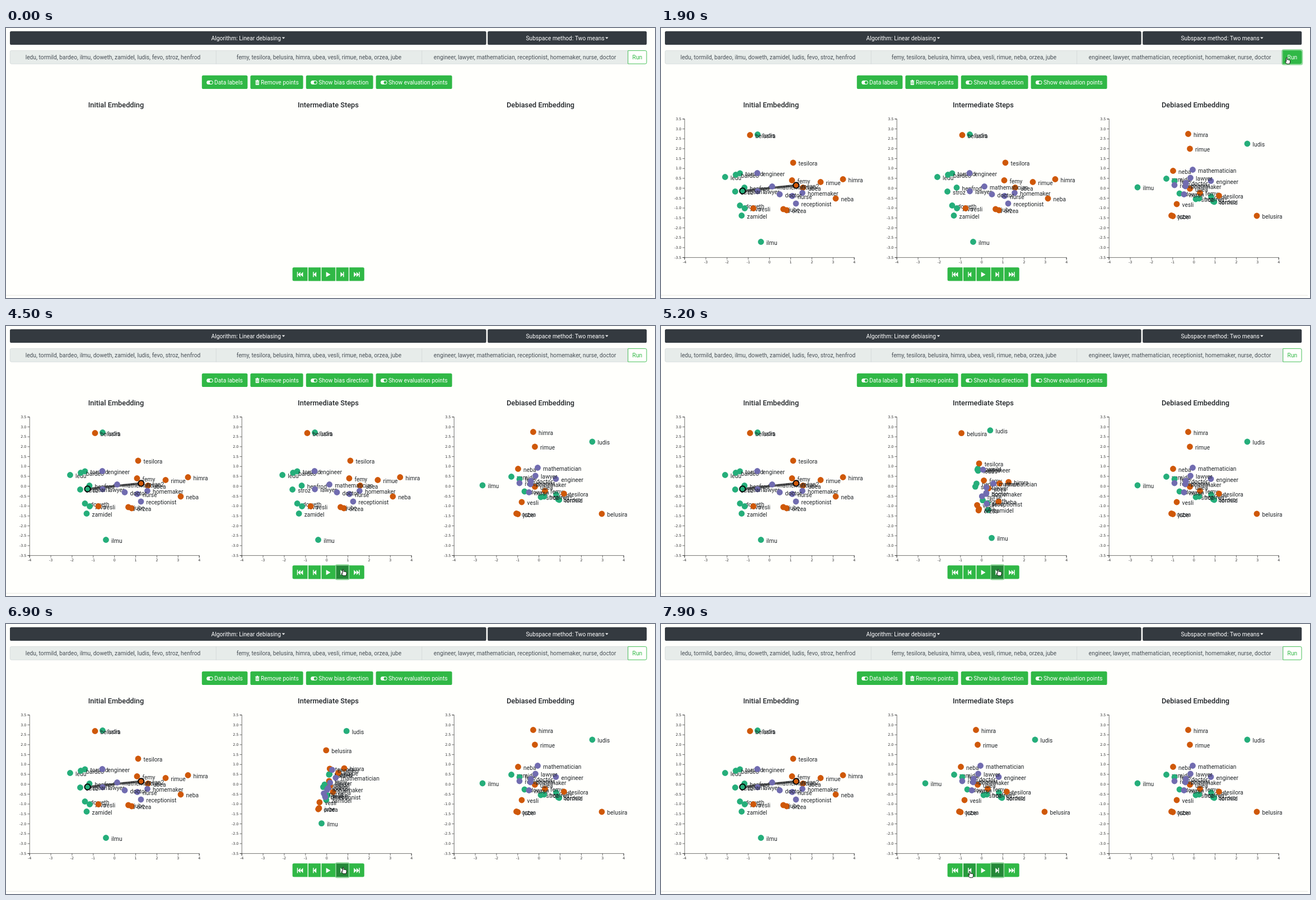
These frames come from a looping animation (1159x483 px, 8 s). An HTML page with a canvas:

```html
<!DOCTYPE html>
<html lang="en">
<head>
<meta charset="utf-8">
<title>Embedding debiasing</title>
<style>
html, body { margin: 0; width: 1159px; height: 483px; overflow: hidden; background: #fffffc; }
canvas { display: block; }
</style>
</head>
<body>
<canvas id="stage" width="1159" height="483"></canvas>
<script>
const ctx = document.getElementById("stage").getContext("2d");
const LOOP = 8000, STEP = 100, PANEL = 379;
const BODY = "10.24px Roboto, sans-serif";
const HEAD = "500 12.8px Roboto, sans-serif";
const TICK = "6.4px 'DejaVu Sans', sans-serif";
const PAGE = "#fffffc", INK = "#212529", DARK = "#343a40";
const GREEN = [48, 184, 70], HOVER = [40, 156, 62], ACTIVE = [36, 136, 56];
const GROUPS = ["#25ae7a", "#cf5808", "#716cb0"];

// word, first x, first y, shift along the bias direction, last x, last y
const WORDS = [
  [["ledu", 114.5, 266.5, 76, 224.5, 301.5],
   ["tormild", 141, 260, 48, 230, 311],
   ["bardeo", 133.5, 262.5, 55, 228, 310],
   ["ilmu", 178.5, 382.5, 34.5, 93, 285],
   ["doweth", 141, 317.5, 57, 168, 296],
   ["zamidel", 144, 335.5, 64, 144.5, 269.5],
   ["ludis", 172.5, 190.5, 38, 289, 207],
   ["fevo", 149.5, 322.5, 57, 159, 274],
   ["stroz", 132.5, 292.5, 52, 197, 306],
   ["henfrod", 149, 285.5, 37, 203, 305]],
  [["femy", 234, 272.5, -38, 204.5, 295],
   ["tesilora", 236, 241, -49, 238.5, 300],
   ["belusira", 159, 191.5, -1.5, 306, 336],
   ["himra", 325, 270.5, -87, 183.5, 189.5],
   ["ubea", 253.5, 285.5, -50, 186.5, 287.5],
   ["vesli", 165, 322.5, 21.5, 163, 315],
   ["rimue", 285, 275.5, -62, 186.5, 216],
   ["neba", 312, 305, -92, 156.5, 255.5],
   ["orzea", 224.5, 326, -38, 153.5, 335.5],
   ["jube", 218.5, 324, -31, 156, 336.5]],
  [["engineer", 172, 259.5, 25, 224, 273.5],
   ["lawyer", 172.5, 292, 31, 187.5, 268],
   ["mathematician", 198.5, 283.5, 17, 191.5, 253.5],
   ["receptionist", 241, 314, -40, 159, 281],
   ["homemaker", 252.5, 295, -53, 178.5, 283],
   ["nurse", 234.5, 300.5, -42, 176, 297.5],
   ["doctor", 212, 297.5, -10.5, 179.5, 277]]
];
const listOf = group => WORDS[group].map(row => row[0]).join(", ");

// time, x, y of the pointer tip
const PATH = [
  [500, 690, 20], [600, 810, 22], [700, 930, 36], [800, 1030, 47], [900, 1060.5, 52],
  [1000, 1060.5, 52], [1100, 1072, 53], [1200, 1105, 54], [1300, 1116, 54], [1400, 1117.5, 53],
  [2500, 1117.5, 53], [2600, 1108, 62], [2700, 1050, 105], [2900, 800, 228], [3000, 688.5, 272],
  [3200, 632, 350], [3400, 617, 381], [3700, 609, 414], [4000, 602, 435.5],
  [7500, 602, 435.5], [7700, 575, 440], [7900, 551.5, 442.5]
];

const clamp = v => Math.max(0, Math.min(1, v));
const ramp = (t, start, length) => clamp((t - start) / length);
const mix = (a, b, k) => a + (b - a) * k;
const blend = (a, b, k) => `rgb(${a.map((v, i) => Math.round(mix(v, b[i], k)))})`;
const cubic = k => k < .5 ? 4 * k ** 3 : 1 - 4 * (1 - k) ** 3;

function text(str, x, y, color, font = BODY, align = "left") {
  ctx.font = font;
  ctx.textAlign = align;
  ctx.fillStyle = color;
  ctx.fillText(str, x, y);
}

function box(x, y, w, h, color, radius = 2.56) {
  ctx.beginPath();
  ctx.roundRect(x, y, w, h, radius);
  ctx.fillStyle = color;
  ctx.fill();
}

function poly(points, color) {
  ctx.beginPath();
  points.forEach(([x, y]) => ctx.lineTo(x, y));
  ctx.closePath();
  ctx.fillStyle = color;
  ctx.fill();
}

function line(x1, y1, x2, y2, color, width) {
  ctx.beginPath();
  ctx.moveTo(x1, y1);
  ctx.lineTo(x2, y2);
  ctx.strokeStyle = color;
  ctx.lineWidth = width;
  ctx.stroke();
}

function dot(x, y, r, color) {
  ctx.beginPath();
  ctx.arc(x, y, r, 0, 7);
  ctx.fillStyle = color;
  ctx.fill();
}

function ring(x, y, w, h, alpha) {
  if (!alpha) return;
  ctx.beginPath();
  ctx.roundRect(x - 1, y - 1, w + 2, h + 2, 3);
  ctx.strokeStyle = `rgba(48,184,70,${.5 * alpha})`;
  ctx.lineWidth = 2;
  ctx.stroke();
}

function header() {
  box(7, 5.7, 850.6, 24.3, DARK);
  box(860.2, 5.7, 284, 24.3, DARK);
  text("Algorithm: Linear debiasing", 366.5, 22, "#fff");
  text("Subspace method: Two means", 928.5, 22, "#fff");
  for (const x of [492.8, 1070.2]) poly([[x, 16.6], [x + 5.4, 16.6], [x + 2.7, 19.4]], "#fff");

  ctx.beginPath();
  ctx.roundRect(7.3, 40.3, 1103, 23.9, [2.5, 0, 0, 2.5]);
  ctx.fillStyle = "#e7ecea";
  ctx.fill();
  ctx.strokeStyle = "#ced4d6";
  ctx.lineWidth = .7;
  ctx.stroke();
  [375.2, 742.7].forEach(x => line(x, 40, x, 64.5, "#ced4d6", .7));
  [191, 559, 926.7].forEach((x, i) => text(listOf(i), x, 56.2, "#495057", BODY, "center"));
}

function runButton(t) {
  const fill = ramp(t, 1150, 150) - ramp(t, 2550, 150);
  const focus = ramp(t, 1650, 150) - ramp(t, 4250, 150);
  ring(1110.3, 40, 34, 24.5, focus);
  ctx.beginPath();
  ctx.roundRect(1110.8, 40.4, 33.2, 23.7, [0, 2.5, 2.5, 0]);
  ctx.fillStyle = blend([255, 255, 252], GREEN, fill);
  ctx.fill();
  ctx.strokeStyle = blend(GREEN, GREEN, 0);
  ctx.lineWidth = .9;
  ctx.stroke();
  text("Run", 1127.4, 56.2, blend(GREEN, [255, 255, 255], fill), BODY, "center");
}

function toggleIcon(x) {
  box(x, 94, 11.6, 7, "#fff", 3.5);
  dot(x + 8.1, 97.5, 2.5, blend(GREEN, GREEN, 0));
}

function trashIcon(x) {
  box(x, 94, 7.6, 1.1, "#fff", .3);
  box(x + 2.2, 92.8, 3.2, 1.2, "#fff", .4);
  box(x + .7, 95.3, 6.2, 6.7, "#fff", .8);
  for (const d of [2.2, 3.8, 5.4]) line(x + d, 96.6, x + d, 100.6, blend(GREEN, GREEN, 0), .6);
}

function toolbar() {
  const items = [
    ["Data labels", 349.8, 431.4, 372], ["Remove points", 436.4, 530.6, 455],
    ["Show bias direction", 535.8, 655.6, 558.3], ["Show evaluation points", 660.6, 796.6, 683]
  ];
  items.forEach(([label, left, right, textX], i) => {
    box(left, 84.8, right - left, 24.3, blend(GREEN, GREEN, 0));
    i === 1 ? trashIcon(445) : toggleIcon(left + 8.4);
    text(label, textX, 101, "#fff");
  });
  ["Initial Embedding", "Intermediate Steps", "Debiased Embedding"].forEach((label, i) =>
    text(label, 196.5 + i * PANEL, 142, INK, HEAD, "center"));
}

const MID = 440.9;
const triangle = (x, w, dir) =>
  poly([[x, MID - 4.6], [x, MID + 4.6], [x + w * dir, MID]], "#fff");
const bar = x => box(x, MID - 4.6, 1.5, 9.2, "#fff", .3);

function playerButtons(t) {
  const edges = [[511.6, 538.6], [540, 562], [563.4, 588.2], [589.5, 611.8], [613.2, 639.8]];
  const nextHover = ramp(t, 3800, 150), press = ramp(t, 4250, 150);
  const next = press ? blend(HOVER, ACTIVE, press) : blend(GREEN, HOVER, nextHover);
  const fills = Array(5).fill(blend(GREEN, GREEN, 0));
  fills[1] = blend(GREEN, HOVER, ramp(t, 7700, 150));
  fills[3] = next;
  edges.forEach(([left, right], i) =>
    box(left, 428.3, right - left, 24.3, fills[i], [i ? 0 : 2.5, i < 4 ? 0 : 2.5, i < 4 ? 0 : 2.5, i ? 0 : 2.5]));
  ring(589.5, 428.3, 22.3, 24.3, press);

  bar(519.8); triangle(525.8, 4.6, -1); triangle(530.4, 4.6, -1);
  bar(548.2); triangle(554.2, 4.9, -1);
  triangle(571.7, 7.8, 1);
  triangle(597.4, 4.9, 1); bar(602);
  triangle(621.2, 4.6, 1); triangle(625.8, 4.6, 1); bar(630.2);
}

function axes(left) {
  const right = left + 303, top = 162.8, bottom = 410.6;
  ctx.beginPath();
  ctx.moveTo(left - 3.8, top);
  ctx.lineTo(left, top);
  ctx.lineTo(left, bottom);
  ctx.lineTo(left - 3.8, bottom);
  ctx.moveTo(left, bottom + 3.8);
  ctx.lineTo(left, bottom);
  ctx.lineTo(right, bottom);
  ctx.lineTo(right, bottom + 3.8);
  ctx.strokeStyle = "#222";
  ctx.lineWidth = .64;
  ctx.stroke();
  for (let i = 0; i <= 14; i++) {
    const y = mix(top, bottom, i / 14);
    line(left - 3.8, y, left, y, "#222", .64);
    text((3.5 - i / 2).toFixed(1), left - 5.8, y + 2.1, "#333", TICK, "right");
  }
  for (let i = 0; i <= 8; i++) {
    const x = mix(left, right, i / 8);
    line(x, bottom, x, bottom + 3.8, "#222", .64);
    text(String(i - 4), x, bottom + 10.4, "#333", TICK, "center");
  }
}

function cloud(offset, project, debias) {
  WORDS.forEach((rows, group) => rows.forEach(([word, x, y, shift, endX, endY]) => {
    const px = offset + mix(x + shift * project, endX, debias);
    const py = mix(y - shift * project * .104, endY, debias);
    dot(px, py, 5.4, GROUPS[group]);
    text(word, px + 9.6, py + 5.1, INK);
  }));
}

function means() {
  [["mean1", 145.6, 291.5], ["mean2", 241.3, 281.5]].forEach(([label, x, y], i) => {
    dot(x, y, 5.2, GROUPS[i]);
    ctx.strokeStyle = "#000";
    ctx.lineWidth = 1.9;
    ctx.stroke();
    text(label, x + 9.6, y + 5.1, INK);
  });
}

function plots(t) {
  if (t < 1800) return;
  const project = cubic(ramp(t, 4420, 1000)), debias = cubic(ramp(t, 6510, 1000));
  for (let i = 0; i < 3; i++) axes(42.2 + i * PANEL);
  line(145.6, 291.5, 241.3, 281.5, "#555", 3.8);
  cloud(0, 0, 0);
  means();
  cloud(PANEL, project, debias);
  cloud(2 * PANEL, 1, 1);
}

function outline(points) {
  poly(points, "#fff");
  ctx.strokeStyle = "#000";
  ctx.lineWidth = .9;
  ctx.lineJoin = "round";
  ctx.stroke();
}

const SHAPES = {
  arrow() {
    outline([[0, 0], [0, 10.6], [2.6, 8.3], [4.4, 12.2], [6.1, 11.4], [4.4, 7.7], [7.9, 7.5]]);
  },
  hand() {
    outline([[-.9, .4], [0, -.1], [.9, .4], [1, 3.8], [2.5, 3.5], [3.2, 4.2], [4.7, 4.1],
      [6.2, 5.1], [6.1, 8], [5.1, 11.2], [-.2, 11.2], [-2.8, 7.4], [-2.4, 6.3], [-.9, 7.2]]);
  },
  beam() {
    line(0, -6, 0, 6, "#000", .9);
    for (const y of [-6, 6]) line(-2.3, y, 2.3, y, "#000", .9);
  }
};

function pointer(t) {
  if (t < PATH[0][0]) return;
  const n = PATH.findIndex(p => p[0] >= t);
  const b = PATH[n], a = PATH[Math.max(0, n - 1)];
  const k = ramp(t, a[0], b[0] - a[0] || 1);
  const x = mix(a[1], b[1], k), y = mix(a[2], b[2], k);
  const overButton = y < 30 || (y > 40 && y < 64 && x > 1110) || y > 428;
  const overInput = y > 40 && y < 64 && x < 1110;
  ctx.save();
  ctx.translate(x, y);
  SHAPES[overButton ? "hand" : overInput ? "beam" : "arrow"]();
  ctx.restore();
}

function draw(now) {
  const t = Math.floor(now % LOOP / STEP) * STEP;
  ctx.fillStyle = PAGE;
  ctx.fillRect(0, 0, 1159, 483);
  line(0, 478.2, 1155, 478.2, "#e3e3e0", .9);
  header();
  runButton(t);
  toolbar();
  plots(t);
  playerButtons(t);
  pointer(t);
}

const start = performance.now();
function tick() {
  draw(performance.now() - start);
  requestAnimationFrame(tick);
}
tick();
</script>
</body>
</html>
```
